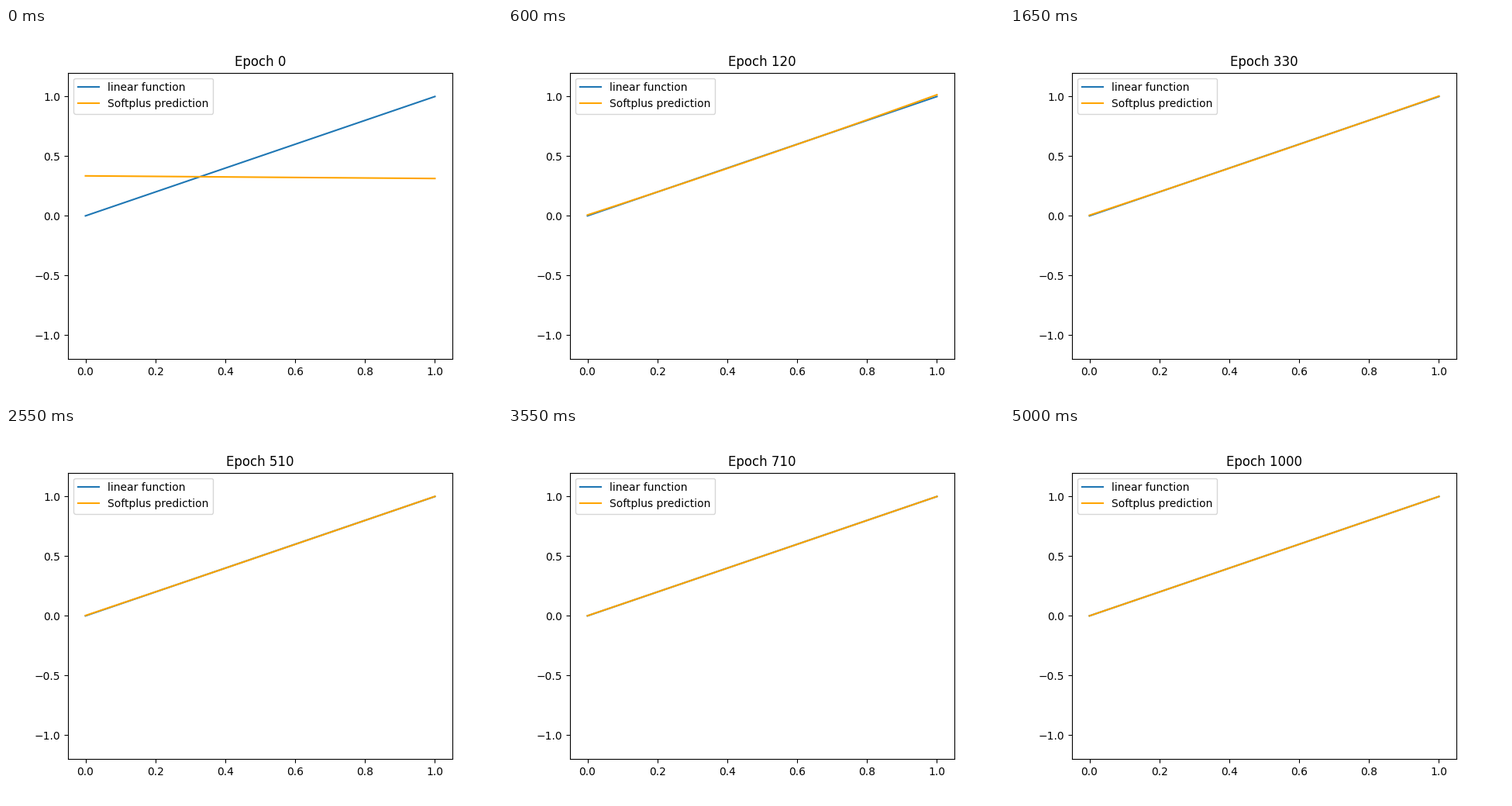
Write a matplotlib script that moves like this. It is 640x480 px and loops after 5.05 s.

```python
import numpy as np
import matplotlib.pyplot as plt
from matplotlib.animation import FuncAnimation

FRAMES = 101
EPOCH_STEP = 10

x = np.linspace(0, 1, 100)


def decay(epoch, span, power=1):
    return np.exp(-(epoch / span) ** power)


def predict(epoch):
    """Quick swing onto the line, then a slow fade of the remaining error."""
    settle = decay(epoch, 50, 2)
    left = 0.327 * settle * np.cos(np.pi * epoch / 80) + 0.008 * decay(epoch, 500, 2)
    right = -0.72 * decay(epoch, 25, 2) + 0.033 * decay(epoch, 150)
    sag = 0.022 * (1 - settle) * decay(epoch, 250)
    return x + left + (right - left) * x - 4 * sag * x * (1 - x)


fig, ax = plt.subplots(figsize=(6.4, 4.8), dpi=100)
ax.plot(x, x, label="linear function")
fit, = ax.plot(x, predict(0), color="orange", label="Softplus prediction")
ax.set_xlim(-0.05, 1.05)
ax.set_ylim(-1.2, 1.2)
ax.legend(loc="upper left")
title = ax.set_title("Epoch 0")


def update(frame):
    epoch = frame * EPOCH_STEP
    fit.set_ydata(predict(epoch))
    title.set_text(f"Epoch {epoch}")
    return fit, title


anim = FuncAnimation(fig, update, frames=FRAMES, interval=50,
                     repeat=True, repeat_delay=0, blit=False)
plt.show()
```
